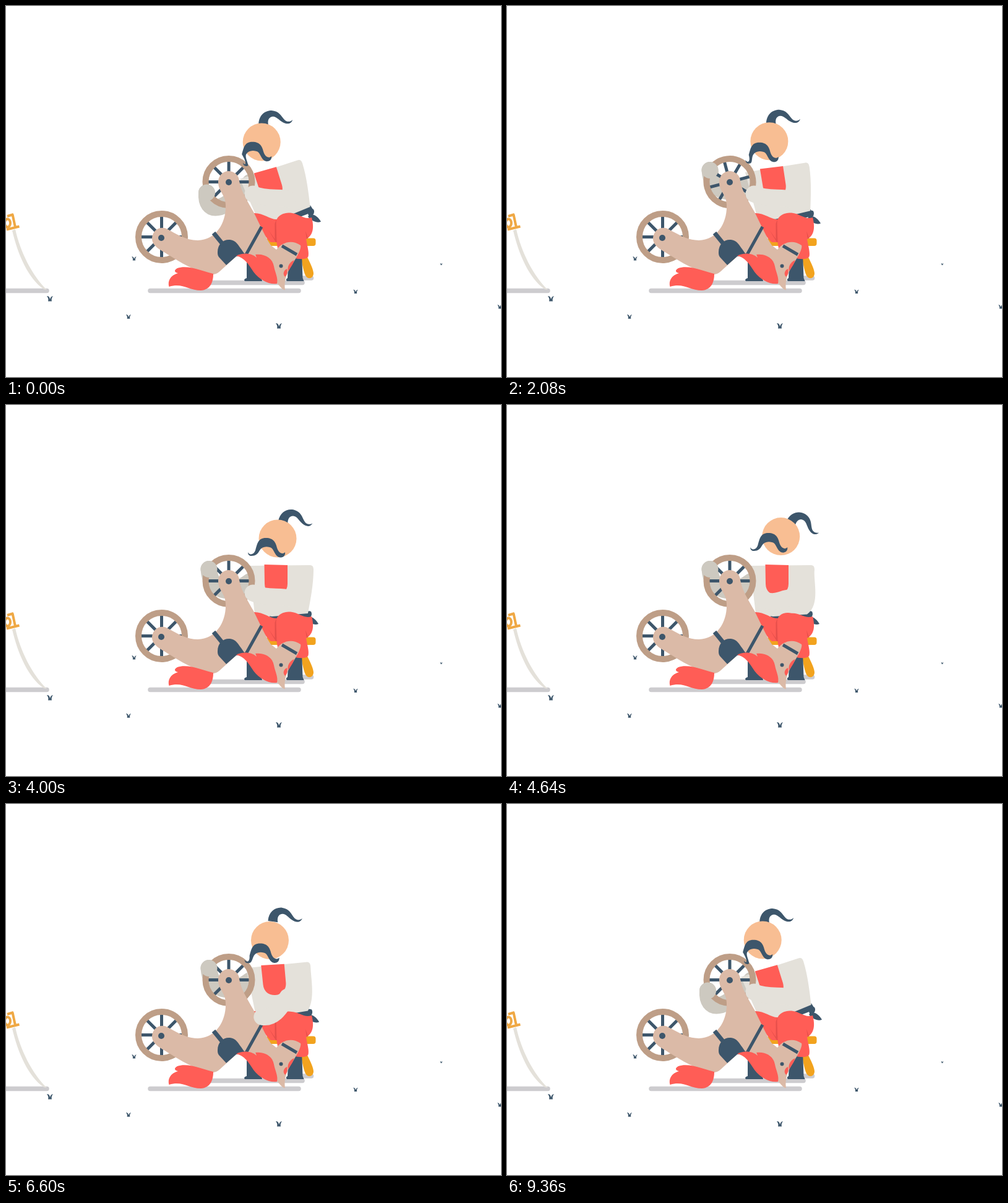
An HTML page that plays this animation: 800x600 px, repeating every 9400 ms.

```html
<!DOCTYPE html>
<html lang="en">
<head>
<meta charset="utf-8">
<title>Rider and wheeled horse</title>
<style>
  html, body { margin: 0; width: 100%; height: 100%; overflow: hidden; background: #fff; }
  svg { display: block; width: 100vw; height: 100vh; }
  .navy { fill: #3d566b; }
  .red { fill: #ff5d56; }
  .dark { fill: #e64f4b; }
  .tan { fill: #dbbaa7; }
  .cloth { fill: #e4e1da; }
  .gold { fill: #f2a31e; }
  .line { fill: none; stroke: #3d566b; }
  .hilt { fill: none; stroke: #efa844; stroke-width: 4; }
  .shade { fill: none; stroke: #cdcccf; stroke-width: 7.5; stroke-linecap: round; }
  .arm { fill: none; stroke-width: 27; stroke-linecap: round; }
</style>
</head>
<body>
<svg viewBox="0 0 800 600">
  <defs>
    <path id="tuft" class="navy" d="M-5-4.500C-1-4.500 0-1 0 1C1-2 2-4 5-4.500C3-2 2 1 3 4H-3C-2 1-3-2-5-4.500Z"/>
    <g id="wheel">
      <path class="line" stroke-width="5" d="M0-34V34M-34 0H34M-24-24L24 24M-24 24L24-24"/>
      <circle r="37.500" fill="none" stroke="#be9e87" stroke-width="10"/>
    </g>
  </defs>

  <path class="shade" d="M-9 460.500H66M233 460.500H473M330 447.500H479M480 440H493.500"/>
  <g id="grass"></g>

  <path class="cloth" d="M10 363L15 361C23 398 43 437 66 459L61 458C36 441 19 402 10 363Z"/>
  <path class="hilt" d="M1 361.500L21.500 356.500M2 340L12 337M10.500 337L15 358"/>
  <ellipse class="hilt" cx="2.500" cy="351" rx="4.500" ry="6.500"/>

  <rect class="gold" x="420" y="375.500" width="80.500" height="12.500" rx="4"/>
  <path class="gold" d="M476 402H485C490 413 496 423 497 432C497 441 488 443 484 436C480 427 478 413 476 402Z"/>
  <path class="navy" d="M389 400H411L413 440L414 445H386Q383 442 389 440ZM457 400H478L479.500 440L481.500 445H454Q451 442 455 440Z"/>

  <path id="back" class="arm" stroke="#cdc9c0"/>
  <g id="knot" class="navy">
    <path d="M483 338C489 332 490 333 493 334C496 340 492 345 486 347Z"/>
    <path d="M486 343C494 341 500 346 505 354C499 357 490 353 484 346Z"/>
  </g>
  <g id="upper">
    <path class="navy" d="M425 340L489 335L492 346L430 350Z"/>
    <path id="torso" class="cloth"/>
    <path class="red" d="M417.500 258L455 259V289C455 314 418 314 418 289Z"/>
  </g>
  <path class="red" d="M400 335C415 334 428 346 438 345V382H428C415 370 402 347 400 335Z"/>
  <path id="thigh" class="red"/>
  <path class="dark" d="M437 345L434.500 352V377L424 362L436 382H437.500L436.500 352ZM484 364L486 377L488 375Z"/>

  <use href="#wheel" transform="translate(251.500 373.500)"/>
  <use href="#wheel" id="spin"/>
  <circle id="palm" r="13.500" fill="#cdc9c0"/>

  <path class="tan" d="M343 285A17 17 0 0 1 377 283C380 300 390 315 400 333C412 357 420 375 428 387L437 394C446 382 462 377 476 387C478 392 470 405 465 414C458 425 448 440 451 459.500C446 459 443 453 436 446L388 402L372 405L350 425C345 430 340 434 335 434C315 432 290 420 270 407C255 398 245 392 243 389.500A17 17 0 0 1 258 359.500C275 368 290 379 310 379C340 378 356 350 355 322C355 305 343 300 343 285Z"/>
  <path class="red" d="M335 433C320 430 295 418 277 424C271 427 272 431 278 432C265 436 261 445 263.500 454C285 447 295 460 315 460C330 459 335 447 335 433Z"/>
  <path class="navy" d="M342 398C342 384 352 377 362 378C372 379 376 388 380 393C383 397 384 400 388 402L372 405L356 419L344 406C342 403 342 401 342 398Z"/>
  <path class="line" stroke-width="7" d="M335.500 367L351 386"/>
  <path class="line" stroke-width="5" d="M388 402L413 357M446 388L470 402"/>
  <path class="red" d="M372 404C381 399 397 399 405 407C404 405 404 403 403 402C418 400 431 408 433 421C435 432 440 439 438 449C425 451 410 443 400 430C392 418 386 407 372 404Z"/>
  <path class="red" d="M466 411C458 414 454 422 456 429L463 418ZM454 425C448 428 447 434 451 438C455 434 455 430 454 425Z"/>
  <circle class="navy" cx="444.500" cy="420.500" r="3"/>
  <circle class="navy" cx="360" cy="285" r="5"/>
  <circle class="navy" cx="251" cy="375" r="5"/>

  <g id="head">
    <path id="hair" class="navy" d="M-5-28C-5-42 4-51 16-51C28-50 31-43 36-37C40-32 46-32 50-36C48-29 41-28 34-32C27-36 23-42 17-41C11-40 9-34 11-27Z"/>
    <circle r="30.500" fill="#f8be93"/>
    <path id="beard" class="navy"/>
  </g>
  <path id="front" class="arm" stroke="#e4e1da"/>
</svg>
<script>
const el = id => document.getElementById(id);
const set = (id, name, value) => el(id).setAttribute(name, value);
const move = (id, x, y, more = '') => set(id, 'transform', `translate(${x} ${y}) ${more}`);

for (const [x, y, s] of [[207, 408.5, .75], [71, 473.5, 1], [198, 502.5, .8], [441, 517.5, 1],
                         [565, 462, .75], [703.5, 417.5, .4], [798, 486.5, .75]])
  el('grass').insertAdjacentHTML('beforeend',
    `<use href="#tuft" transform="translate(${x} ${y}) scale(${s})"/>`);

// lean and hair in degrees; lift of the head, press on the wheel and sigh as shares;
// x and y place the near hand
const upright = { lean: 0, lift: 0, hair: 12, press: 0, sigh: 0, x: 399, y: 304 };
const mid = { ...upright, lean: 8.5, hair: 0 };
const down = { ...mid, lean: 17.4, lift: .9, press: 1 };
const sigh = { ...upright, lift: 1, hair: 36, sigh: 1, x: 418, y: 318 };
const nod = { ...sigh, lift: -.7, hair: 10 };
const pat = { ...mid, lift: -.7, x: 411, y: 362 };

const smooth = u => u * u * (3 - 2 * u), speedUp = u => u * u, slowDown = u => u * (2 - u);
const keys = [];
for (let t = 0; t <= 3200; t += 800) keys.push([t, down], [t + 240, mid], [t + 520, mid]);
keys.pop();
keys.push([4000, upright, speedUp], [5280, sigh, slowDown], [5520, sigh], [5760, nod],
          [6240, nod], [6880, pat], [8640, pat], [9360, down], [9400, down]);

function poseAt(t) {
  const i = keys.findIndex(k => k[0] > t);
  const [t0, a] = keys[i - 1], [t1, b, ease = smooth] = keys[i];
  const u = ease((t - t0) / (t1 - t0)), pose = {};
  for (const part in a) pose[part] = a[part] + (b[part] - a[part]) * u;
  // the far hand swings clear of the rim on its way down
  pose.swing = b.press > a.press ? 5 * Math.sin(Math.PI * u) : 0;
  // two strokes along the horse's neck
  for (const start of [7000, 7760]) {
    const s = Math.sin(Math.PI * Math.min(1, Math.max(0, (t - start) / 640))) ** 2;
    pose.x -= 12 * s;
    pose.y -= 26 * s;
  }
  return pose;
}

function draw(t) {
  const { lean, lift, hair, press, sigh: s, swing, x, y } = poseAt(t);

  set('upper', 'transform', `rotate(${-lean} 450 319)`);
  set('torso', 'd', `M393 260L490 259Q497 258 497 266C${497 - 3 * s} ${290 - 7 * s} `
    + `${492 + 20 * s} ${315 + 10 * s} ${488 - 4 * s} ${337 + 2 * s}L430 342L402 338Z`);
  move('knot', lean * .23, lean * -.3);
  set('thigh', 'd', `M436 353C436 339 448 334 460 ${334.5 + 3 * s}C474 336 481 346 494 342`
    + 'C498 357 497 371 485 377C487 389 490 398 488.500 405C486 411 472 409 466 408L440 398L437 380Z');

  const handX = 328 - 3.5 * press - swing, handY = 265.5 + 36.5 * press;
  set('back', 'd', `M${handX} ${handY}C${330 - 8 * press} ${300 + 35 * press} `
    + `${360 - 10 * press} ${312 + 26 * press} 395 285`);
  move('palm', handX, handY);
  set('front', 'd', `M${x} ${y}C${x + 20} ${y * .85 + 55} 444 ${(y + 312) / 2} 455 312`);

  // the head turns with the torso; the moustache and its loose tip hang lower as it leans
  const a = lean * Math.PI / 180, cos = Math.cos(a), sin = Math.sin(a);
  move('head', 450 - 11 * cos - 103 * sin + 5 * lift, 319 - 103 * cos + 11 * sin - 4.5 * lift);
  move('hair', 0, 4.5 * Math.min(0, lift), `rotate(${hair})`);
  move('beard', .33 * lean - 2 * lift, .35 * lean - 6 * lift);
  const tip = (px, py) => `${px + .8 * lean} ${py + .6 * lean} `;
  set('beard', 'd', `M${tip(-48, 22)}C${tip(-46, 27)}${tip(-39, 27)}-36 19C-33 9-32-1-19-1`
    + 'C-6-1-3 7-1 15C1 22 7 27 12 22C13 31 4 32 0 29C-6 25-6 15-13 14C-20 12-26 14-29 19'
    + `C-32 25 ${tip(-36, 28)}${tip(-42, 28)}C${tip(-46, 28)}${tip(-48, 26)}${tip(-48, 22)}Z`);

  move('spin', 360, 284.5, `rotate(${Math.min(t / 3840, 1) * 720})`);
}

function tick() {
  draw(performance.now() % 9400);
  requestAnimationFrame(tick);
}
tick();
</script>
</body>
</html>
```
